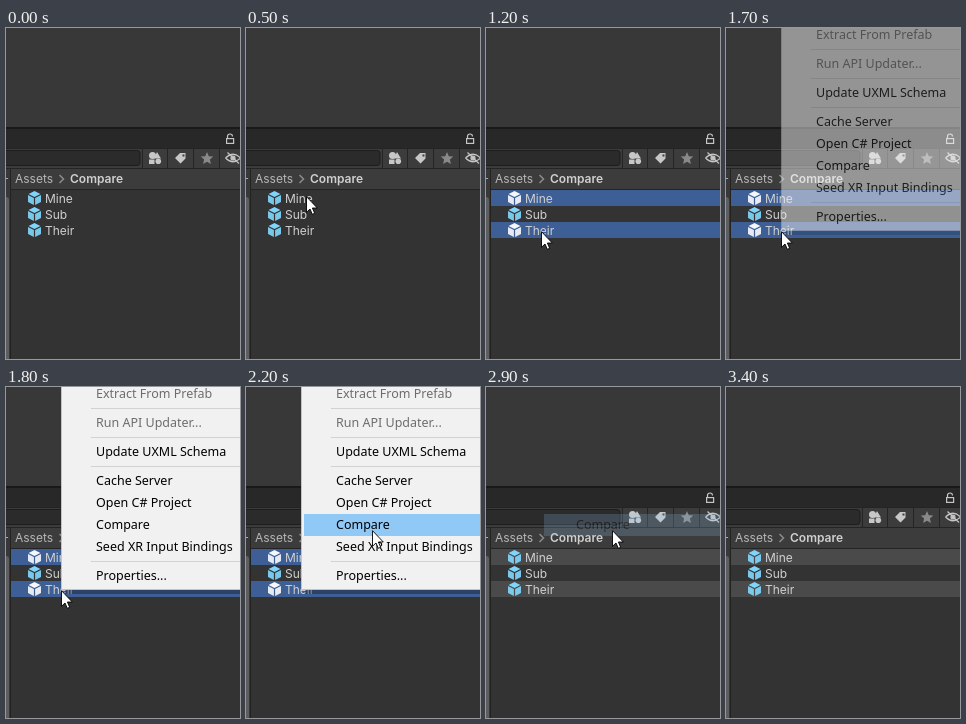
Recreate the animation shown at these times as an HTML page. Size 234 px wide and 331 px high, loop 4 s.

```html
<!DOCTYPE html>
<html lang="en">
<head>
<meta charset="utf-8">
<title>Compare assets</title>
<style>
  html, body { margin: 0; width: 100%; height: 100%; overflow: hidden; background: #333; }
  svg { display: block; width: 100vw; height: 100vh; }
  text { white-space: pre; }
  .ui { font: 12px Inter, sans-serif; fill: #d0d0d0; }
  .menu-text { font: 12.5px "Noto Sans", sans-serif; fill: #000; }
  .off { fill: #6d6d6d; }
  .cube { color: #7fd5fc; }

  /* One frame step is 100 ms, or 2.5 % of the loop. */
  .anim { animation: 4s step-end infinite; }
  #cursor { animation-name: cursor; }
  #mine-bar { animation-name: mine-bar; }
  #mine-icon { animation-name: mine-icon; }
  #their-bar { animation-name: their-bar; }
  #their-icon { animation-name: their-icon; }
  #menu { animation-name: menu; }
  #hover { animation-name: hover; }
  #chosen { animation-name: chosen; }

  @keyframes cursor {
    0% { transform: translate(-40px, 40px); }
    2.5% { transform: translate(-2px, 64px); }
    5% { transform: translate(14px, 102px); }
    7.5% { transform: translate(36px, 140px); }
    10% { transform: translate(54px, 162px); }
    12.5% { transform: translate(60px, 168px); }
    20% { transform: translate(60px, 178px); }
    22.5% { transform: translate(57px, 195px); }
    25% { transform: translate(55px, 203px); }
    47.5% { transform: translate(62px, 196px); }
    50% { transform: translate(84px, 180px); }
    52.5% { transform: translate(112px, 154px); }
    55% { transform: translate(126px, 143px); }
    80% { transform: translate(156px, 124px); }
    82.5% { transform: translate(221px, 84px); }
    85%, 100% { transform: translate(260px, 60px); }
  }
  @keyframes mine-bar {
    0% { fill: transparent; }
    15% { fill: #3e5f96; }
    67.5%, 100% { fill: #4a4a4a; }
  }
  @keyframes their-bar {
    0% { fill: transparent; }
    30% { fill: #3e5f96; }
    67.5%, 100% { fill: #4a4a4a; }
  }
  @keyframes mine-icon {
    0% { color: #7fd5fc; }
    15% { color: #f4f7fb; }
    67.5%, 100% { color: #7fd5fc; }
  }
  @keyframes their-icon {
    0% { color: #7fd5fc; }
    30% { color: #f4f7fb; }
    67.5%, 100% { color: #7fd5fc; }
  }
  @keyframes menu {
    0% { opacity: 0; }
    42.5% { opacity: .5; }
    45% { opacity: 1; }
    67.5%, 100% { opacity: 0; }
  }
  @keyframes hover {
    0% { opacity: 0; transform: translateY(178px); }
    47.5% { opacity: 1; transform: translateY(178px); }
    52.5% { opacity: 1; transform: translateY(149px); }
    55%, 100% { opacity: 1; transform: translateY(127px); }
  }
  @keyframes chosen {
    0% { opacity: 0; }
    67.5% { opacity: .72; }
    70% { opacity: .45; }
    72.5% { opacity: .2; }
    75%, 100% { opacity: 0; }
  }
</style>
</head>
<body>
<svg viewBox="0 0 234 331" preserveAspectRatio="none">
  <defs>
    <g id="cube" fill="currentColor">
      <path d="M6.5 0 12.4 2.9 6.5 5.9.6 2.9Z"/>
      <path d="M0 4 5.9 7V14L0 11Z" opacity=".92"/>
      <path d="M13 4 7.1 7V14L13 11Z" opacity=".92"/>
    </g>
  </defs>

  <!-- Panels -->
  <rect width="234" height="331" fill="#333"/>
  <rect width="234" height="99" fill="#383838"/>
  <rect y="99" width="234" height="2" fill="#191919"/>
  <rect y="101" width="234" height="19" fill="#282828"/>
  <rect y="120" width="234" height="41" fill="#3c3c3c"/>
  <path d="M0 120.5H234M0 140.5H234M0 161.5H234M136.5 120V140M161.5 120V140M187.5 120V140M213.5 120V140" stroke="#242424"/>
  <rect x="-8" y="122.5" width="142" height="15" rx="3" fill="#2b2b2b" stroke="#1d1d1d"/>
  <rect y="141" width="4" height="190" fill="#383838"/>
  <rect x="-8" y="169" width="11" height="170" rx="3" fill="#5e5e5e"/>
  <rect x="4" y="141" width="1" height="190" fill="#222"/>
  <rect y="150" width="2" height="1" fill="#aaa"/>

  <!-- Toolbar icons -->
  <g fill="none" stroke="#c4c4c4" stroke-width="1.2">
    <path d="M221.5 110V108.5A2.5 2.5 0 0 1 226.500 108.500"/>
    <rect x="220.600" y="110.600" width="7" height="4.800"/>
    <path d="M219.500 130Q227 122.500 234.500 130Q227 137.500 219.500 130M221.500 124.500 233 135.500"/>
    <circle cx="227" cy="130" r="2" fill="#c4c4c4"/>
  </g>
  <g fill="#c8c8c8">
    <circle cx="146.500" cy="127.500" r="3.500"/>
    <path d="M151 124 155 130.500H148ZM143 131.500H148.500V136H143Z"/>
    <circle cx="152.300" cy="133.300" r="2.800"/>
    <path fill-rule="evenodd" d="M169 130 174 125H179.500V130.500L174.500 135.500ZM176.500 126.500V128.500H178.500V126.500Z"/>
  </g>
  <path d="M201 124 202.800 128.200 207.300 128.600 203.900 131.600 204.900 136 201 133.700 197.100 136 198.100 131.600 194.700 128.600 199.200 128.200Z" fill="#898989"/>

  <!-- Breadcrumb -->
  <g class="ui">
    <text x="9" y="155" style="fill:#b8b8b8">Assets</text>
    <text x="64" y="155" font-weight="600">Compare</text>
  </g>
  <path d="M53.500 147 57.500 151 53.500 155" fill="none" stroke="#8c8c8c" stroke-width="1.500"/>

  <!-- Asset list -->
  <rect id="mine-bar" class="anim" x="5" y="162" width="229" height="16" fill="transparent"/>
  <rect id="their-bar" class="anim" x="5" y="194" width="229" height="16" fill="transparent"/>
  <g id="mine-icon" class="anim cube"><use href="#cube" x="22" y="163"/></g>
  <g class="cube"><use href="#cube" x="22" y="179"/></g>
  <g id="their-icon" class="anim cube"><use href="#cube" x="22" y="195"/></g>
  <g class="ui">
    <text x="39" y="175">Mine</text>
    <text x="39" y="191">Sub</text>
    <text x="39" y="207">Their</text>
  </g>

  <!-- Context menu -->
  <g id="menu" class="anim" opacity="0">
    <rect x="59" y="203" width="175" height="4" fill="#000" opacity=".3"/>
    <rect x="55" y="-4" width="190" height="207" fill="#f1f1f1"/>
    <path d="M55.500 0V202.500H234" fill="none" stroke="#c4c4c4"/>
    <path d="M85 21.500H234M85 50.500H234M85 79.500H234M85 174.500H234" stroke="#d2d2d2"/>
    <rect id="hover" class="anim" x="58" width="176" height="22" fill="#90c8f6"/>
    <g class="menu-text">
      <text class="off" x="90" y="11">Extract From Prefab</text>
      <text class="off" x="90" y="40">Run API Updater...</text>
      <text x="90" y="69">Update UXML Schema</text>
      <text x="90" y="98">Cache Server</text>
      <text x="90" y="120">Open C# Project</text>
      <text x="90" y="142">Compare</text>
      <text x="90" y="164">Seed XR Input Bindings</text>
      <text x="90" y="193">Properties...</text>
    </g>
  </g>
  <g id="chosen" class="anim" opacity="0">
    <rect x="58" y="127" width="176" height="22" fill="#90c8f6"/>
    <text class="menu-text" x="90" y="142">Compare</text>
  </g>

  <g id="cursor" class="anim">
    <path d="M.5.700V16.300L4 13 6.300 18.300 8.700 17.300 6.400 12H11.300Z" fill="#fff" stroke="#000" stroke-width=".9"/>
  </g>
</svg>
</body>
</html>
```
